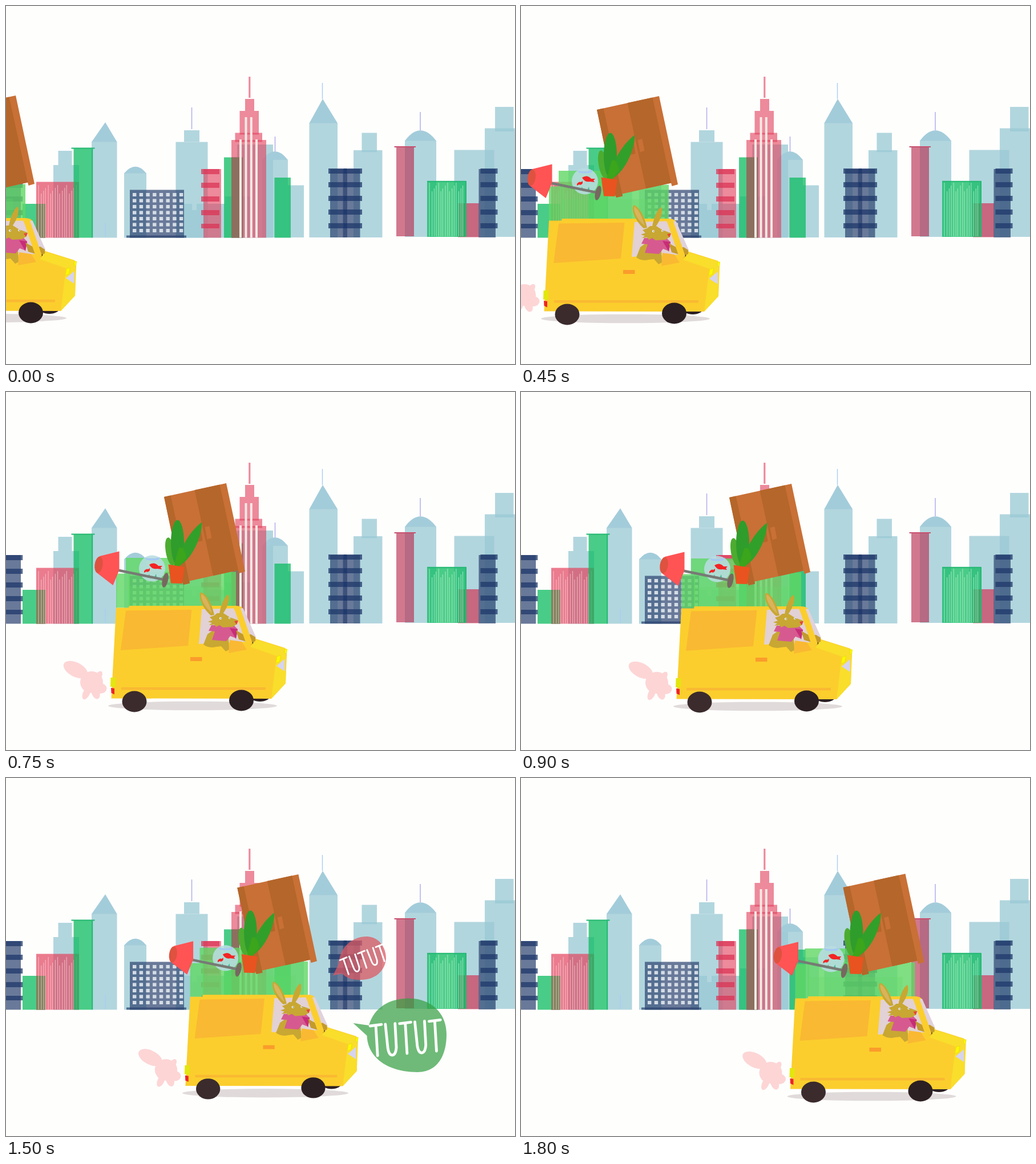
Animation, 892 px wide and 628 px high, one loop 1.95 s. Source, as an HTML page:

```html
<!DOCTYPE html>
<html lang="en">
<head>
<meta charset="utf-8">
<title>Moving van</title>
<style>
html, body { margin: 0; height: 100%; overflow: hidden; background: #fefefd; }
svg { display: block; width: 100%; height: 100%; }
.slab { fill: none; stroke-dasharray: 9 15; }
.navy { fill: #2b4270; fill-opacity: .7; stroke: #1f386b; stroke-opacity: .75; }
.navy .slab, .red .slab { fill: none; }
.letters { fill: none; stroke: #fff; stroke-linecap: round; stroke-linejoin: round; vector-effect: non-scaling-stroke; }
</style>
</head>
<body>
<svg viewBox="0 0 892 628">
  <g id="city">
    <g fill="#98c8d5" fill-opacity=".75">
      <path d="M83 279h45v127.500h-45z"/><path d="M91.500 254h24v25h-24z"/>
      <path d="M150 238h44.500v168.500h-44.500z"/>
      <path d="M207 293h39v113.500h-39z"/>
      <path d="M297.500 238.500h56v168h-56z"/><path d="M312 218h27v20.500h-27z"/>
      <path d="M312 347h14v11h8v-11h50v-13h44v72.500H312z"/>
      <path d="M405 243h63v163.500h-63z"/>
      <path d="M449 270h45v136h-45z"/>
      <path d="M494 314.500h28v91.500h-28z"/>
      <path d="M531.500 205h49.500v201h-49.500z"/>
      <path d="M609 253h50.500v153h-50.500z"/><path d="M623.500 222.500h26.500v34h-26.500z"/>
      <path d="M699 236h55v169h-55z"/>
      <path d="M785.500 252.500h70v152.500h-70z"/>
      <path d="M839 214.500h53v190.500h-53z"/><path d="M857 177h32.500v43h-32.500z"/>
    </g>
    <path fill="#a3ccda" d="M150 238.500L174 204L194.500 238.500zM531.500 205.500L555 163L581 205.500zM207 293.500Q227 270 246 293.500zM449 270Q471 240 494 270zM699 236.500Q726 200 754 236.500z"/>
    <path stroke="#b5b2ef" stroke-width="1.600" d="M325.500 178V216M471.500 229V255M726 186V218"/>
    <path stroke="#a9ccf2" stroke-width="1.400" d="M554.500 135V163M174 380V405"/>

    <g fill="#0dbb60" fill-opacity=".75">
      <path d="M29 347h40v59.500h-40z"/><path d="M382 265.500h33v141h-33z"/>
      <path d="M470.500 301h28.500v105.500h-28.500z"/>
    </g>

    <g class="red" fill="#e33e5a" fill-opacity=".6" stroke="#dc2f52" stroke-opacity=".7">
      <g stroke="none">
        <path d="M53 308.500h75v98h-75z" fill-opacity=".68"/>
        <path d="M346 286h31v120.500h-31z"/>
        <path d="M425.200 124h3.200v37h-3.200z"/>
        <path d="M419 163h16v21h-16z"/>
        <path d="M409.500 184h33.500v41.500h-33.500z"/>
        <path d="M401.500 222.500h47.500v16h-47.500z"/>
        <path d="M395 235h61v171.500h-61z"/>
        <path d="M684 246h31v158h-31z" fill="#b92e50" fill-opacity=".64"/>
        <path d="M792 346h37v59.500h-37z" fill="#d13355" fill-opacity=".68"/>
      </g>
      <path class="slab" stroke-width="32" d="M358 286V390"/>
      <path stroke="#c6506e" stroke-opacity="1" stroke-width="2" d="M680.500 247H718"/>
    </g>
    <path fill="#8d6f5f" d="M395 265.500h20v141h-20z"/>
    <path fill="#80805c" d="M53 347h16v59.500h-16z"/>
    <path stroke="#f6e9e4" stroke-width="4" d="M411 234V406.500M420.500 195V406.500M429.800 195V406.500M439 234V406.500"/>
    <path id="pinkStripes" stroke="#f6dde0" stroke-opacity=".6" stroke-width="1.200"/>

    <path fill="#0dbb60" fill-opacity=".75" d="M118.500 249h33.500v157.500h-33.500zM738 307h68.500v98h-68.500z"/>
    <path fill="none" stroke="#25b873" stroke-width="2" d="M114.500 249.500H155.500M151.200 249V406M738 307.800H806.500M806 307V405"/>
    <path id="greenStripes" stroke="#b8efce" stroke-opacity=".7" stroke-width="1.200"/>

    <g class="navy">
      <g stroke="none">
        <path d="M0 286h26v120.500H0z"/>
        <path d="M217 322.500h95v84h-95z"/><path d="M211 402.500h105v4h-105z"/>
        <path d="M568 286h30v120h-30z"/><path d="M590.500 286h30v120h-30z"/>
        <path d="M828.500 286h29.500v120h-29.500z"/>
      </g>
      <path class="slab" stroke-width="29.500" d="M14.500 286V390"/>
      <path class="slab" stroke-width="32" d="M581 285V390"/>
      <path class="slab" stroke-width="32" d="M608 285V390"/>
      <path class="slab" stroke-width="30" d="M846.500 285V390"/>
    </g>
    <path id="windows" stroke="#d4dce5" stroke-width="6.200" stroke-dasharray="6.400 5.300"/>
  </g>

  <g id="van">
    <g fill="#fdd5d5">
      <ellipse cx="45" cy="486" rx="23" ry="12.500" transform="rotate(27 45 486)"/>
      <ellipse cx="73" cy="508" rx="20" ry="19"/>
      <ellipse cx="83" cy="500" rx="13" ry="6" transform="rotate(-55 83 500)"/>
      <ellipse cx="89" cy="519" rx="10.500" ry="9"/>
      <ellipse cx="64" cy="527" rx="6" ry="12" transform="rotate(25 64 527)"/>
      <ellipse cx="80" cy="526" rx="7" ry="12" transform="rotate(-20 80 526)"/>
    </g>
    <ellipse cx="250" cy="549.500" rx="148" ry="7.800" fill="#e0dbda"/>

    <g fill="#5fd765" fill-opacity=".8">
      <path d="M133 290h81v28h-81z"/>
      <path d="M116 317.500h24v60h-24z"/>
      <path d="M138 314.500h188v62h-188z"/>
      <path d="M140 340h164v36h-164z" fill-opacity=".25"/>
    </g>
    <circle cx="179" cy="308.500" r="23" fill="#b9dde2" fill-opacity=".88"/>
    <path d="M166 289.500q13 4 27 -1l-3 5q-11 2-21 0z" fill="#a6c8f5"/>
    <path fill="#f42424" d="M174 302q9-6 16 2l7 0-3 3 2 3-8-1q-9 2-14-7zM165 313q4-5 7-3l3-2 0 4q-3 4-6 2l-4 2z"/>
    <path d="M171 325l3-7 2 7zM182 326l4-8 1 7z" fill="#3fb994"/>
    <path d="M175 326l4-5 2 5z" fill="#f29d3c"/>

    <g id="wardrobe">
      <path fill="#c87036" d="M200 183L309 159L342 314L331.500 317L330 311.500L244.500 330.500L245 334.500L234 337L231 330z"/>
      <path fill="#b5662a" d="M200 183L211.500 180.500L245 334.500L234 337L231 330zM253.500 171L297.500 161.500L330 311.500L286 321.300z"/>
      <path fill="#c87036" d="M271.500 236l8-2 4 21-8 2.500z"/>
      <path fill="#b5662a" d="M256 244l8.500-4 3 20-8 2z"/>
    </g>

    <g id="plant">
      <ellipse cx="211" cy="279" rx="8" ry="25" fill="#4cac30" transform="rotate(-10 211 279)"/>
      <ellipse cx="223.500" cy="263" rx="11.500" ry="39.500" fill="#2f9d2b"/>
      <path fill="#31a02a" d="M266 227.500C268 248 249 296 223 305C224 278 244 244 266 227.500z"/>
      <path fill="#3ba51b" d="M217 304L226 272Q236 268 239 290L226 306z"/>
      <path fill="#e9531f" d="M207.500 301.500L236 306L231.500 335L212 334.500z"/>
    </g>

    <g id="lamp">
      <path d="M119 311.500L201 328.500" stroke="#777a75" stroke-width="4.500"/>
      <ellipse cx="202" cy="329" rx="5" ry="13" fill="#77685f" transform="rotate(13 202 329)"/>
      <path fill="#ff5354" d="M87 287L121.500 278.500L121.500 311L110.500 338L82 316z"/>
      <ellipse cx="85.500" cy="302" rx="7" ry="14.500" fill="#de523f" transform="rotate(8 85.500 302)"/>
    </g>

    <ellipse cx="368" cy="532" rx="18" ry="10" fill="#2d2023"/>
    <path fill="#fbce2d" d="M116 377.500H138L139 374H326Q336 374 339 380L361 432L412 448L415 459L413 510L388 537L107.500 536.500z"/>
    <path fill="#f9de2b" d="M362 433.500L413 449L414 456L413 510L388 537L397 462L351 446z"/>
    <path fill="#fab932" d="M133 382.500L248.500 381L242 444L124 452zM125 517H378V521.500H125z"/>
    <path fill="#e2d1d5" d="M266 380L322 378.500L340 414L347 437L261 441z"/>
    <path fill="#e0d2dd" d="M333 378.500H338.500L361 429L354 437z"/>

    <g id="rabbit" fill="#c8a733">
      <path fill="#3a2a2b" d="M350 428l7 3-1 9-6 3z"/>
      <path d="M264 350.500C273 351 284 371 288 390L282 391C270 381 259 361 264 350.500z"/>
      <path fill="#d9b35c" d="M265.500 353C272 356 280 371 284 387C273 378 263 362 265.500 353z"/>
      <path d="M312.500 354C317 362 310 380 302 389L297 388C299 374 306 357 312.500 354z"/>
      <path d="M287 416L276 424L269 442Q278 449 291 446L300 445L308 454L314 451L313 430z"/>
      <path fill="#d65a90" d="M283 408L322 408L329 415L326 431L316 427L309 436L284 434L289 419L278 418z"/>
      <path fill="#c72d78" d="M315 413L329 415L326 432z"/>
      <path fill="#c39a2d" d="M326 417L342 426L352 424L360 429L360 436L351 439L331 433z"/>
      <path d="M277 402L285 399L280 394L288 391L293 387L304 387L315 394L329 399L328 406L320 411L303 412L297 408L291 411L288 407L279 408L284 404z"/>
      <path fill="#e8452f" d="M323 401l7-1-3 7z"/>
      <circle cx="299" cy="396" r="2" fill="#fff"/><circle cx="315" cy="395.500" r="1.800" fill="#fff"/>
      <circle cx="299.500" cy="396" r=".8" fill="#333"/><circle cx="315.400" cy="395.500" r=".8" fill="#333"/>
    </g>

    <path fill="#fbce2d" d="M322 376H333L355 440L346 447z"/>
    <path fill="#fab932" d="M315 434L336 437L345 451L313 457z"/>
    <path fill="#fa9c2c" d="M246 464H266.500V471H246z"/>
    <path fill="#e4e60e" d="M106.500 500H115V516H106z"/>
    <path fill="#ee2426" d="M107 518L113 519V529.500L107.500 527z"/>
    <path fill="#fdf800" stroke="#e6dc10" stroke-width=".8" d="M398 463L404.500 461L402.500 472L396 474.500zM411.500 450L415.500 450L414.500 458L411 457z"/>
    <path fill="#d6d3f0" d="M397 479.500L411.500 467V489z"/>
    <ellipse cx="148" cy="542" rx="21.500" ry="18.500" fill="#3b2b2d"/>
    <ellipse cx="335.500" cy="540" rx="21.500" ry="18.500" fill="#2d2023"/>
  </g>

  <g id="horn">
    <path fill="#dd5a63" fill-opacity=".74" d="M534 346.500L544 326C546 296 568 278 594 278C615 279 627 297 627 317C625 340 606 354 584 354C568 355 556 350 550 343z"/>
    <path fill="#349e41" fill-opacity=".7" d="M569.500 430L597 434C606 402 634 386.500 667 386.500C706 387 733 412 733 450C733 491 714 516 682 516C632 516 595 492 593.500 452z"/>
    <path class="letters" stroke-width="4.800" transform="translate(599 434) rotate(-4.500)"/>
    <path class="letters" stroke-width="2.800" transform="translate(546 319) rotate(-20) scale(.645 .54)"/>
  </g>
</svg>
<script>
const $ = id => document.getElementById(id);
const range = (n, f) => Array.from({ length: n }, (_, i) => f(i)).join('');

// facade details
const stripes = (x, n, gap, top, bottom) =>
  range(n, i => `M${x + i * gap + i * i % 3 * .7} ${top + i * 7 % 4 * 5}V${bottom}`);
$('pinkStripes').setAttribute('d', stripes(57, 17, 4.1, 314, 406));
$('greenStripes').setAttribute('d', stripes(742, 16, 3.9, 310, 404));
$('windows').setAttribute('d', range(7, i => `M222 ${331 + i * 10.5}H311`));

// hand lettering
const glyphs = {
  T: x => `M${x} 1L${x + 20} 0M${x + 10} 1L${x + 9} 54`,
  U: x => `M${x + 1} 0L${x + 2} 42Q${x + 3} 55 ${x + 9} 55T${x + 17} 42L${x + 18} 0`
};
const lettering = [...'TUTUT'].map((c, i) => glyphs[c](i * 25.9)).join('');
document.querySelectorAll('.letters').forEach(p => p.setAttribute('d', lettering));

// one pose per 150 ms: x, y, scale
const stop = [169.7, 12.4, .983];
const poses = [
  [-292, -2], [-213, -2], [-134, -2], [-67, -1], [0, 0], [77, 1], [165, 2],
  stop, stop, stop, [208.7, 12.6, .983], [260, 9], [364.5, 9]
];
const step = 150, honkStart = 7, honkEnd = 10;

function draw(now) {
  const i = Math.floor(now / step) % poses.length;
  const [x, y, scale = 1] = poses[i];
  $('van').setAttribute('transform', `translate(${x} ${y}) scale(${scale})`);
  $('horn').setAttribute('visibility', i >= honkStart && i <= honkEnd ? 'visible' : 'hidden');
  $('horn').setAttribute('transform', `translate(${x - stop[0]} 0)`);
}

let start;
function tick(now) {
  start ??= now;
  draw(now - start);
  requestAnimationFrame(tick);
}
draw(0);
requestAnimationFrame(tick);
</script>
</body>
</html>
```
